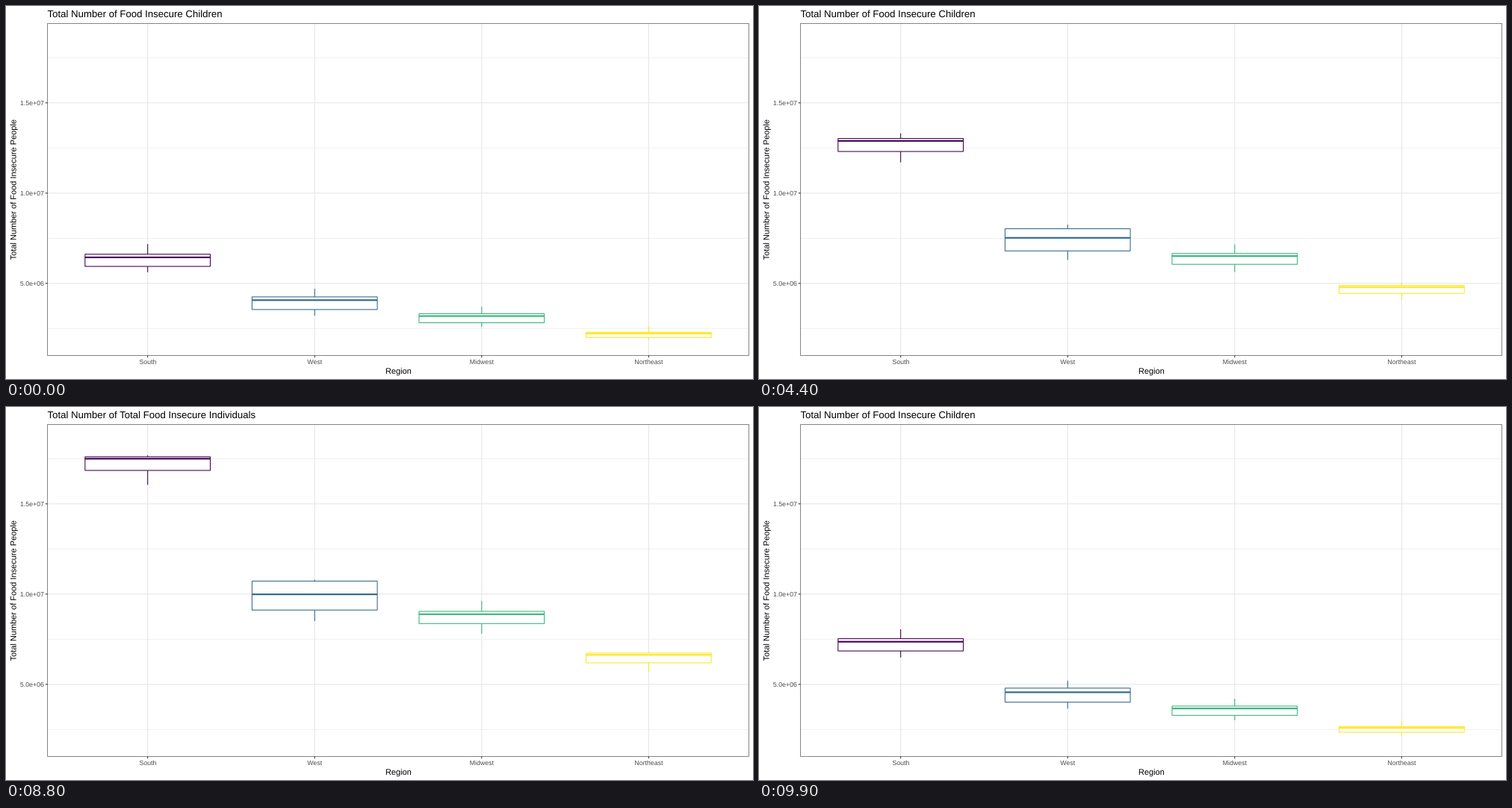
These frames come from a looping animation (1000x500 px, 10000 ms). A matplotlib script:

```python
import matplotlib.pyplot as plt
import numpy as np
from matplotlib.animation import FuncAnimation
from matplotlib.patches import PathPatch, Rectangle
from matplotlib.textpath import TextPath
from matplotlib.transforms import Affine2D

plt.rcParams.update({
    "font.family": "Liberation Sans",
    "path.snap": False,
    "lines.solid_capstyle": "butt",
})

W, H, DPI = 1000, 500, 100
PX = 72 / DPI  # points per pixel
LEFT, RIGHT, TOP, BOTTOM = 55.5, 994.5, 23.5, 468.4
LINE = 1.07
GRID, DARK, GREY = "#E6E6E6", "#333333", "#4D4D4D"
HOLD, STEPS = 38, 13  # still frames, then steps from one state to the other
CYCLE = HOLD + STEPS - 1
TITLES = ("Total Number of Food Insecure Children",
          "Total Number of Total Food Insecure Individuals")
SLOT = (RIGHT - LEFT) / 4.2
BOX_W = 0.75 * SLOT

fig = plt.figure(figsize=(W / DPI, H / DPI), dpi=DPI, facecolor="white")
ax = fig.add_axes([0, 0, 1, 1])
ax.set(xlim=(0, W), ylim=(H, 0))
ax.axis("off")


def y_of(millions):
    return 371.8 - (millions - 5) * 24.2


def line(xs, ys, color, width=LINE, z=1):
    return ax.plot(xs, ys, color=color, lw=width * PX, zorder=z)[0]


def label(x, y, text, size, color="black", align=0.5, turn=0):
    """Text as outlines, so that letters sit at exact fractions of a pixel."""
    path = TextPath((0, 0), text, size=size)
    shift = -align * path.get_extents().x1
    place = Affine2D().translate(shift, 0).scale(1, -1).rotate_deg(-turn)
    return ax.add_patch(PathPatch(place.translate(x, y).transform_path(path),
                                  fc=color, lw=0, zorder=7))


def five_numbers(middle, rise, drop, above, below):
    q3, q1 = middle + rise, middle - drop
    return y_of(np.array([q3 + above, q3, middle, q1, q1 - below]))


class Region:
    """One box; each state is given by its median and the drop to the lower
    quartile, in millions. Whiskers follow from these."""

    def __init__(self, name, children, everyone, rise=0.1, above=0.045):
        self.name = name
        mid, drop = children
        child_stats = five_numbers(mid, 0.35 * drop, drop,
                                   0.22 * mid ** 0.5, 0.65 * drop)
        mid, drop = everyone
        all_stats = five_numbers(mid, rise, drop, above, 0.195 * mid ** 0.5)
        self.states = child_stats, all_stats

    def draw(self, x, color):
        left = x - BOX_W / 2
        self.upper = line((x, x), (0, 0), color, z=3)
        self.lower = line((x, x), (0, 0), color, z=3)
        self.box = ax.add_patch(Rectangle((left, 0), BOX_W, 0, fc="white",
                                          ec=color, lw=LINE * PX, zorder=4))
        self.median = line((left, left + BOX_W), (0, 0), color, 2 * LINE, 5)

    def move(self, share):
        start, end = self.states
        high, q3, mid, q1, low = start + (end - start) * share
        self.upper.set_ydata((high, q3))
        self.lower.set_ydata((q1, low))
        self.box.set_y(q3)
        self.box.set_height(q1 - q3)
        self.median.set_ydata((mid, mid))


regions = [
    Region("South", (6.44, 0.5), (18.42, 0.66)),
    Region("West", (4.07, 0.52), (10.48, 0.9), rise=0.78),
    Region("Midwest", (3.19, 0.37), (9.36, 0.53), rise=0.16, above=0.6),
    Region("Northeast", (2.22, 0.22), (7.0, 0.46)),
]

for value in np.arange(2.5, 18, 2.5):
    y = y_of(value)
    if value % 5:
        line((LEFT, RIGHT), (y, y), "#EBEBEB", 0.7)
    else:
        line((LEFT, RIGHT), (y, y), GRID)
        line((LEFT - 2.75, LEFT), (y, y), DARK)
        label(50.5, y + 3.2, f"{value * 1e6:.1e}", 8.8, GREY, align=1)

for i, region in enumerate(regions):
    x = LEFT + SLOT * (0.6 + i)
    line((x, x), (TOP, BOTTOM), GRID)
    line((x, x), (BOTTOM, BOTTOM + 2.75), DARK)
    label(x, 480, region.name, 8.8, GREY)
    region.draw(x, plt.cm.viridis(i / 3))

ax.add_patch(Rectangle((LEFT, TOP), RIGHT - LEFT, BOTTOM - TOP, fill=False,
                       ec=DARK, lw=0.6 * PX, zorder=6))
titles = [label(LEFT, 15, text, 13.2, align=0) for text in TITLES]
label((LEFT + RIGHT) / 2, 493, "Region", 11)
label(13.5, (TOP + BOTTOM) / 2 + 0.5, "Total Number of Food Insecure People",
      11, turn=90)


def update(frame):
    state, local = divmod(frame, CYCLE)
    step = max(0, local - HOLD + 1)
    for region in regions:
        region.move(abs(state - step / STEPS))
    shown = state if step <= 7 else 1 - state
    for i, title in enumerate(titles):
        title.set_visible(i == shown)


anim = FuncAnimation(fig, update, frames=2 * CYCLE, interval=100,
                     init_func=lambda: update(0), repeat=True, repeat_delay=0)
plt.show()
```
